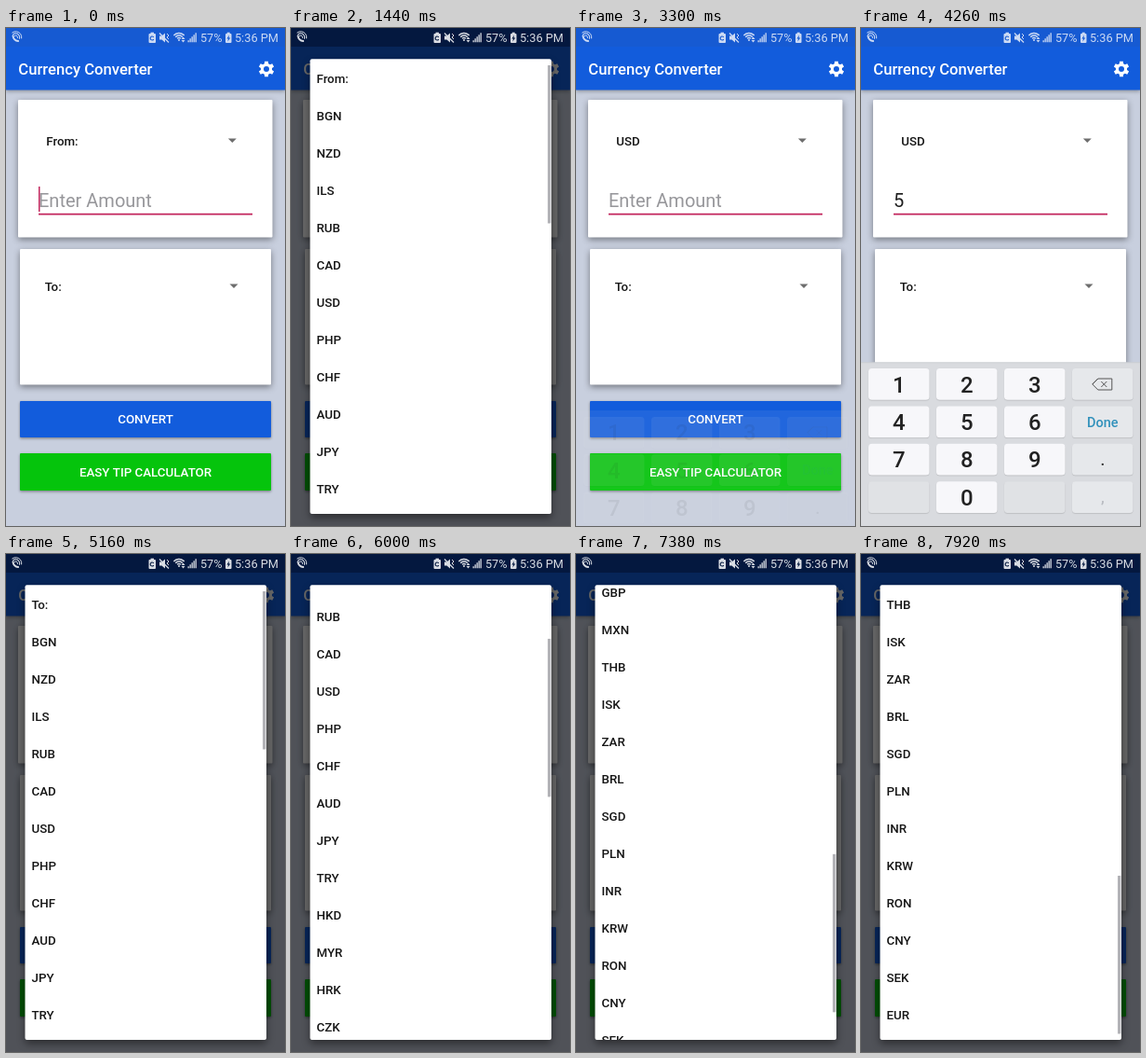
Recreate the animation shown at these times as an HTML page with a canvas. Size 300x534 px, loop 8000 ms.

```html
<!DOCTYPE html>
<html lang="en">
<head>
<meta charset="utf-8">
<title>Currency Converter</title>
<style>
  html, body { margin: 0; width: 100%; height: 100%; overflow: hidden; background: #c8cfde; }
  canvas { display: block; width: 100vw; height: 100vh; }
</style>
</head>
<body>
<canvas id="stage"></canvas>
<script>
const W = 300, H = 534, LOOP = 8000, STEP = 60;
const BLUE = '#125cdc', GREEN = '#05c40c', PAGE = '#c8cfde', PINK = '#c2255c', INK = '#161616';
const CODES = ('BGN NZD ILS RUB CAD USD PHP CHF AUD JPY TRY HKD MYR HRK CZK IDR DKK ' +
  'NOK HUF GBP MXN THB ISK ZAR BRL SGD PLN INR KRW RON CNY SEK EUR').split(' ');
const ROW = 40, MAX_SCROLL = 880;
// Moments at which the text cursor flips, starting from visible.
const BLINKS = [240, 480, 780, 1020, 1380, 1440, 2700, 2940, 3240, 3540, 3840, 3900, 4260, 4560, 4860];

const canvas = document.getElementById('stage');
const ctx = canvas.getContext('2d');

const progress = (t, a, b) => Math.min(1, Math.max(0, (t - a) / (b - a)));
const easeOut = (p, n) => 1 - (1 - p) ** n;

function text(str, x, cy, size, color, weight = 500, align = 'left') {
  ctx.font = `${weight} ${size}px Roboto, sans-serif`;
  ctx.textAlign = align;
  ctx.fillStyle = color;
  ctx.fillText(str, x, cy + size * 0.355);
}

function rect(x, y, w, h, color, r = 0) {
  ctx.fillStyle = color;
  ctx.beginPath();
  ctx.roundRect(x, y, w, h, r);
  ctx.fill();
}

function raised(x, y, w, h, color, r, blur, drop, alpha) {
  ctx.save();
  ctx.shadowColor = `rgba(0,0,0,${alpha})`;
  ctx.shadowBlur = blur * scale;
  ctx.shadowOffsetY = drop * scale;
  rect(x, y, w, h, color, r);
  ctx.restore();
}

function poly(points, color) {
  ctx.fillStyle = color;
  ctx.beginPath();
  points.forEach(([x, y]) => ctx.lineTo(x, y));
  ctx.closePath();
  ctx.fill();
}

function line(points, color, width) {
  ctx.strokeStyle = color;
  ctx.lineWidth = width;
  ctx.beginPath();
  points.forEach(([x, y], i) => i ? ctx.lineTo(x, y) : ctx.moveTo(x, y));
  ctx.stroke();
}

function arc(x, y, r, from, to, color, width) {
  ctx.strokeStyle = color;
  ctx.lineWidth = width;
  ctx.beginPath();
  ctx.arc(x, y, r, from * Math.PI, to * Math.PI);
  ctx.stroke();
}

function gear(cx, cy) {
  ctx.save();
  ctx.translate(cx, cy);
  ctx.fillStyle = '#fff';
  ctx.beginPath();
  for (let i = 0; i < 6; i++) {
    const mid = i * Math.PI / 3 - Math.PI / 2;
    for (const [da, r] of [[-0.36, 6.1], [-0.22, 8.5], [0.22, 8.5], [0.36, 6.1]]) {
      ctx.lineTo(r * Math.cos(mid + da), r * Math.sin(mid + da));
    }
  }
  ctx.closePath();
  ctx.moveTo(3, 0);
  ctx.arc(0, 0, 3, 0, Math.PI * 2);
  ctx.fill('evenodd');
  ctx.restore();
}

function statusBar(covered) {
  const back = covered ? '#04183f' : '#165ad2';
  const c = covered ? '#d9dce3' : '#ccdaf4';
  if (covered) rect(0, 0, W, 20, back);

  // Handset with waves
  ctx.lineCap = 'round';
  arc(13.5, 8, 6, 0.52, 0.98, c, 2);
  arc(10.5, 10, 2, 1.3, 2.1, c, 1);
  arc(10.5, 10, 4.2, 1.25, 2.1, c, 1.1);
  arc(10.5, 10, 6.3, 1.3, 2.05, c, 1);
  ctx.lineCap = 'butt';

  // Battery saver
  rect(153.5, 6, 7.5, 10, c, 1);
  rect(155.5, 4.7, 3.5, 2, c);
  arc(157.2, 11, 2, 0.2, 1.8, back, 1.1);

  // Muted speaker
  poly([[165, 8.5], [167.5, 8.5], [171, 5.5], [171, 15.5], [167.5, 12.5], [165, 12.5]], c);
  line([[165, 5.5], [175, 15.5]], c, 1.2);
  line([[173, 6], [175, 8], [173, 10], [175, 12]], c, 1);

  // Wireless and signal
  for (const r of [2.5, 5, 7.5]) arc(186, 13, r, 1.23, 1.77, c, 1.4);
  rect(185, 12, 2, 2, c, 1);
  poly([[188.5, 12], [192.5, 12], [190.5, 9.5]], c);
  poly([[188.5, 13], [192.5, 13], [190.5, 15.5]], c);
  for (let i = 0; i < 5; i++) rect(195.5 + i * 2, 13.3 - i * 2, 1.3, 2 + i * 2, c);

  text('57%', 209, 10.7, 12.6, c, 400);
  rect(236, 6, 6.5, 10, c, 1);
  rect(237.7, 4.7, 3, 2, c);
  poly([[240, 7.5], [237.4, 11.5], [239, 11.5], [238.4, 14.5], [241.2, 10.5], [239.5, 10.5]], back);
  text('5:36 PM', 293, 10.7, 12.8, c, 400, 'right');
}

function dropdown(label, x, cy, arrowX) {
  text(label, x, cy, 13.33, INK);
  poly([[arrowX - 4.5, cy - 2.3], [arrowX + 4.5, cy - 2.3], [arrowX, cy + 2.3]], '#6e6e6e');
}

function button(label, y, h, color) {
  raised(15, y, 270, h, color, 1, 3, 1.2, 0.4);
  text(label, 150, y + h / 2, 13.33, '#fff', 500, 'center');
}

function page(t) {
  rect(0, 0, W, H, PAGE);
  raised(0, 0, W, 66.5, BLUE, 0, 4, 1.5, 0.3);
  rect(0, 0, W, 20, '#165ad2');
  text('Currency Converter', 13.3, 44.3, 16.67, '#fff');
  gear(280, 44);

  raised(13, 77, 273.5, 147.5, '#fff', 1, 7, 2.5, 0.42);
  dropdown(t < 2220 ? 'From:' : 'USD', 43.3, 120.8, 243.3);
  if (t < 3900) text('Enter Amount', 35, 185, 20, '#97979b', 400);
  else text('5', 35, 185, 20, '#202020', 400);
  rect(35, 198.8, 230, 1.6, PINK);
  if (BLINKS.filter(b => b <= t).length % 2 === 0) {
    rect(t < 3900 ? 35 : 46.3, 170, 1.5, 27, PINK);
  }

  raised(15, 237, 270, 145.5, '#fff', 1, 7, 2.5, 0.42);
  dropdown('To:', 41.8, 276.8, 245);

  button('CONVERT', 400, 39, BLUE);
  button('EASY TIP CALCULATOR', 456, 40, GREEN);
}

function keyboard(alpha, offset, pressed) {
  if (alpha <= 0) return;
  ctx.save();
  ctx.globalAlpha = alpha;
  ctx.translate(0, offset);
  rect(0, 358.5, W, 180, '#d9dbdf');
  rect(0, 358.5, W, 0.8, '#c6c9ce');
  ['123<', '456D', '789.', ' 0 ,'].forEach((keys, r) => [...keys].forEach((key, c) => {
    const x = 8 + c * 73, y = 365 + r * 40.4, cx = x + 32.8, cy = y + 17;
    const isDigit = key >= '0' && key <= '9';
    const face = key === pressed ? '#d0d3da' : isDigit ? '#f7f7fa' : c === 3 ? '#e6e8eb' : '#e0e2e5';
    raised(x, y, 65.5, 33.8, face, 3.5, 1, 0.7, 0.16);
    if (isDigit) text(key, cx, cy, 24, '#222', 500, 'center');
    else if (key === 'D') text('Done', cx, cy, 14.5, '#3191bb', 500, 'center');
    else if (key === '.') text(key, cx, cy, 17, '#333', 500, 'center');
    else if (key === ',') text(key, cx, cy, 17, '#b9bcc1', 500, 'center');
    else if (key === '<') {
      line([[cx - 11, cy], [cx - 5, cy - 6], [cx + 10, cy - 6], [cx + 10, cy + 6], [cx - 5, cy + 6],
        [cx - 11, cy], [cx - 5, cy - 6]], '#555', 1);
      line([[cx - 1.5, cy - 3], [cx + 4.5, cy + 3]], '#555', 1);
      line([[cx + 4.5, cy - 3], [cx - 1.5, cy + 3]], '#555', 1);
    }
  }));
  ctx.restore();
}

function dialog(title, scroll, dim, alpha) {
  rect(0, 0, W, H, `rgba(0,0,0,${0.6 * dim})`);
  ctx.save();
  ctx.globalAlpha = alpha;
  raised(20.5, 33.3, 259.5, 487.7, '#fff', 2, 9, 4, 0.45);
  ctx.beginPath();
  ctx.rect(21, 34, 259, 487);
  ctx.clip();
  [title, ...CODES].forEach((label, i) => {
    const y = 54 + i * ROW - scroll;
    if (y > 20 && y < H) text(label, 27.5, y, 13.33, INK);
  });
  rect(276, 40 + 305 * scroll / MAX_SCROLL, 3.4, 169.5, '#b4b4b8');
  ctx.restore();
}

// Three swipes; the last one runs out at the end of the list.
function scrollAt(t) {
  return 40 * easeOut(progress(t, 5520, 5760), 2)
    + 250 * easeOut(progress(t, 5880, 6480), 2.5)
    + 55 * progress(t, 6660, 6840) ** 2
    + 535 * easeOut(progress(t, 6840, 7920), 3);
}

function draw(t) {
  page(t);

  const show = progress(t, 3285, 3500), hide = progress(t, 4290, 4530);
  keyboard(show * (1 - hide), 60 * ((1 - show) ** 2 + hide ** 2), t >= 3840 && t < 3960 ? '5' : '');

  const closing = 1 - progress(t, 2220, 2460);
  const first = progress(t, 1140, 1350) * closing;
  const second = progress(t, 4920, 5130);
  if (first > 0) dialog('From:', 0, first, closing < 1 ? closing ** 2.3 : first);
  if (second > 0) dialog('To:', scrollAt(t), second, second);
  statusBar(first > 0 || second > 0);
}

let scale = 1;
function resize() {
  const dpr = window.devicePixelRatio || 1;
  canvas.width = Math.round(innerWidth * dpr);
  canvas.height = Math.round(innerHeight * dpr);
  scale = canvas.width / W;
  ctx.setTransform(scale, 0, 0, canvas.height / H, 0, 0);
}
addEventListener('resize', resize);
resize();

const start = performance.now();
function tick() {
  const t = (performance.now() - start) % LOOP;
  draw(Math.floor(t / STEP) * STEP);
  requestAnimationFrame(tick);
}
tick();
</script>
</body>
</html>
```
